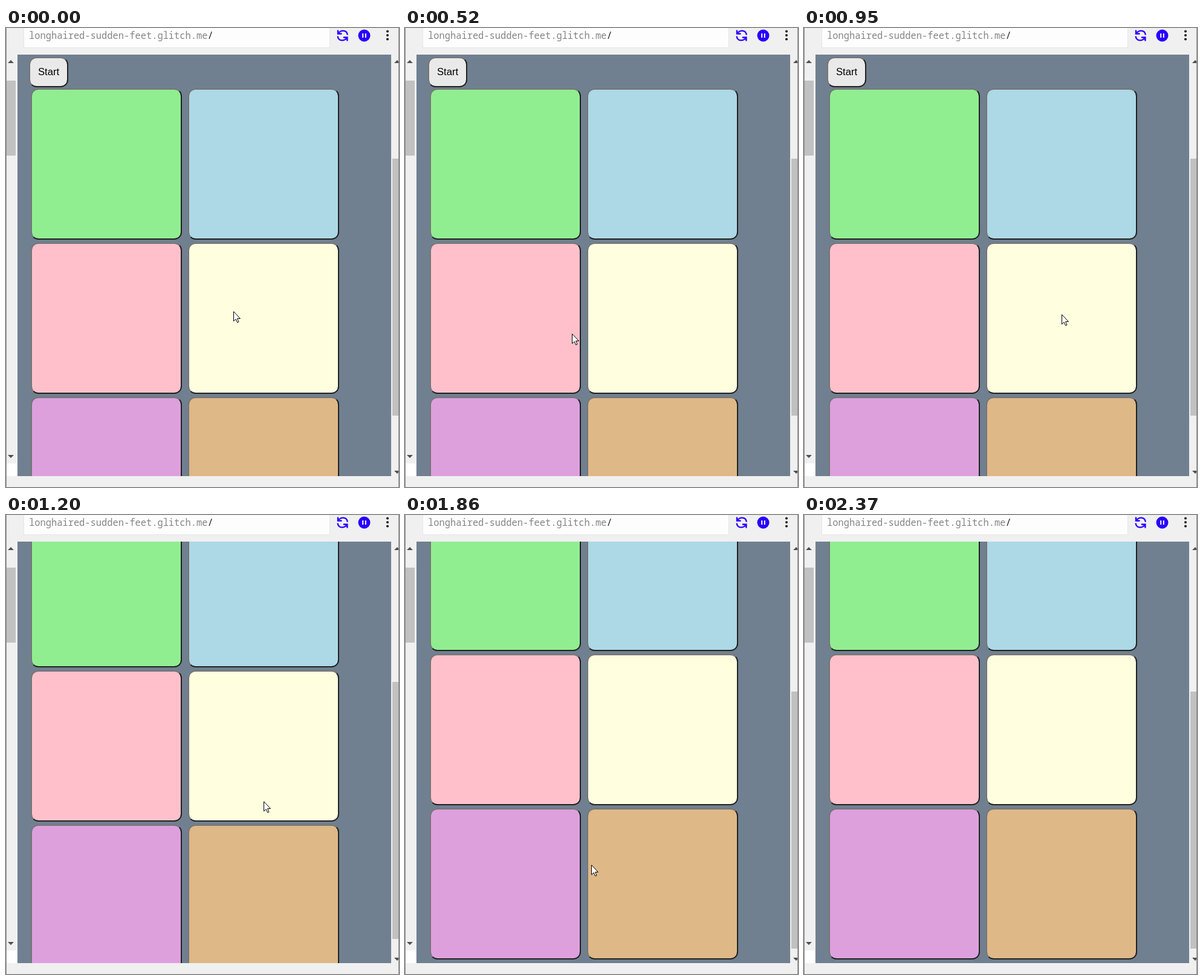
An HTML page for the animation above (2900 ms loop, 650 by 759 pixels).

```html
<!DOCTYPE html>
<html lang="en">
<head>
<meta charset="utf-8">
<title>Memory game</title>
<style>
  :root { --lit: #767676; --dark: #212121; --blue: #2800ff; }
  html, body { margin: 0; width: 100%; height: 100%; overflow: hidden; background: #f0f0f0; }
  div, svg { position: absolute; box-sizing: border-box; }
  .stage { left: 0; top: 0; width: 650px; height: 759px; overflow: hidden; background: #f0f0f0; }

  /* every moving part shares one clock with hard steps */
  .page, .thumb, .cursor, .pink, .yellow, .plum, .tan {
    animation: 2900ms step-end infinite;
  }

  .url {
    left: 29px; top: -10px; width: 507px; height: 43px;
    border: 1px solid #e6e6e6; background: #fdfdfd;
    font: 15.4px/20px "Noto Sans Mono", "DejaVu Sans Mono", monospace;
    color: #858585; white-space: pre; padding: 12px 0 0 8px;
  }
  .url b { font-weight: 400; color: #222; }

  .view { left: 19px; top: 44px; width: 618px; height: 697px; overflow: hidden; background: #708090; }
  .page { left: -19px; top: -44px; width: 650px; height: 870px; animation-name: scroll; }
  .btn {
    width: 250px; height: 250px; border: 2px solid; border-radius: 12.5px;
    border-color: var(--lit) var(--dark) var(--dark) var(--lit);
  }
  .start {
    left: 38px; top: 48px; width: 65px; height: 50px; background: #e9e9e9;
    font: 16.67px/46px Arial, "Liberation Sans", sans-serif; text-align: center; color: #000;
  }
  .green, .pink, .plum { left: 41px; }
  .sky, .yellow, .tan { left: 301px; }
  .green, .sky { top: 100px; }
  .pink, .yellow { top: 355px; }
  .plum, .tan { top: 610px; }
  .green { background: lightgreen; }
  .sky { background: lightblue; }
  .pink { background: pink; --press: red; animation-name: press-pink; }
  .yellow { background: lightyellow; --press: yellow; animation-name: press-yellow; }
  .plum { background: plum; --press: darkorchid; animation-name: press-plum; }
  .tan { background: burlywood; --press: chocolate; animation-name: press-tan; }

  .bar { background: #c1c1c1; }
  .left-bar { left: 1px; top: 87px; width: 15px; height: 124px; }
  .thumb { left: 639px; top: 216px; width: 10px; height: 425px; animation-name: thumb; }
  .corner { left: 1px; top: 720px; width: 17px; height: 21px; background: #fff; }
  .edge { top: 0; width: 1px; height: 759px; background: #8c8c8c; }
  .icons { left: 0; top: 0; }
  .cursor { left: 0; top: 0; animation-name: point; }

  @keyframes scroll {
    0% { transform: none; }
    41.379% { transform: translateY(-98px); }
    46.551%, 100% { transform: translateY(-125px); }
  }
  @keyframes thumb {
    0% { transform: none; }
    41.379% { transform: translateY(60px); }
    46.551%, 100% { transform: translateY(76px); }
  }
  @keyframes press-pink {
    8.275% { background: var(--press); border-color: var(--dark) var(--lit) var(--lit) var(--dark); }
    0%, 17.931%, 100% { background: pink; border-color: var(--lit) var(--dark) var(--dark) var(--lit); }
  }
  @keyframes press-yellow {
    23.103% { background: var(--press); border-color: var(--dark) var(--lit) var(--lit) var(--dark); }
    0%, 32.758%, 100% { background: lightyellow; border-color: var(--lit) var(--dark) var(--dark) var(--lit); }
  }
  @keyframes press-plum {
    54.827% { background: var(--press); border-color: var(--dark) var(--lit) var(--lit) var(--dark); }
    0%, 58.965%, 100% { background: plum; border-color: var(--lit) var(--dark) var(--dark) var(--lit); }
  }
  @keyframes press-tan {
    68.275% { background: var(--press); border-color: var(--dark) #b0692f #b0692f var(--dark); }
    0%, 72.413%, 100% { background: burlywood; border-color: var(--lit) var(--dark) var(--dark) var(--lit); }
  }
  @keyframes point {
    0% { transform: translate(376px, 468px); visibility: visible; }
    4.137% { transform: translate(314px, 491px); }
    8.275% { transform: translate(276px, 505px); }
    23.103% { transform: translate(426px, 473px); }
    50.689% { transform: translate(238px, 562px); }
    54.827% { transform: translate(184px, 586px); }
    64.137% { transform: translate(308px, 578px); }
    68.275% { transform: translate(382px, 573px); }
    76.551% { transform: translate(406px, 628px); visibility: visible; }
    81.724%, 100% { transform: translate(406px, 628px); visibility: hidden; }
  }
</style>
</head>
<body>
<div class="stage">
  <div class="url">longhaired-sudden-feet.glitch.me<b>/</b></div>

  <div class="view">
    <div class="page">
      <div class="btn start">Start</div>
      <div class="btn green"></div>
      <div class="btn sky"></div>
      <div class="btn pink"></div>
      <div class="btn yellow"></div>
      <div class="btn plum"></div>
      <div class="btn tan"></div>
    </div>
  </div>

  <div class="bar left-bar"></div>
  <div class="bar thumb"></div>
  <div class="corner"></div>

  <svg class="icons" width="650" height="759">
    <g fill="none" stroke="#2800ff" stroke-width="2.4">
      <path id="turn" d="M549 3.5V9.5H555.5M549.8 9C552 3.6 563.8 1.8 564.8 11.5"/>
      <use href="#turn" transform="rotate(180 556.7 12.5)"/>
    </g>
    <circle cx="592.5" cy="12.5" r="10" fill="#2800ff"/>
    <path d="M590.2 9V16M594.8 9V16" stroke="#fff" stroke-width="2"/>
    <g fill="#222">
      <circle cx="631" cy="5.5" r="2.1"/>
      <circle cx="631" cy="12" r="2.1"/>
      <circle cx="631" cy="18.5" r="2.1"/>
    </g>
    <path fill="#505050" d="M3 58L8 53L13 58ZM3 706L8 711L13 706ZM642 58L647 53L652 58ZM642 732L647 737L652 732Z"/>
  </svg>

  <div class="edge" style="left:0"></div>
  <div class="edge" style="left:649px"></div>

  <svg class="cursor" width="13" height="21">
    <path d="M.5 .8V16.8L4.2 13.4L6.6 19L9 18L6.6 12.5H11.4Z" fill="#fff" stroke="#000"/>
  </svg>
</div>
</body>
</html>
```
